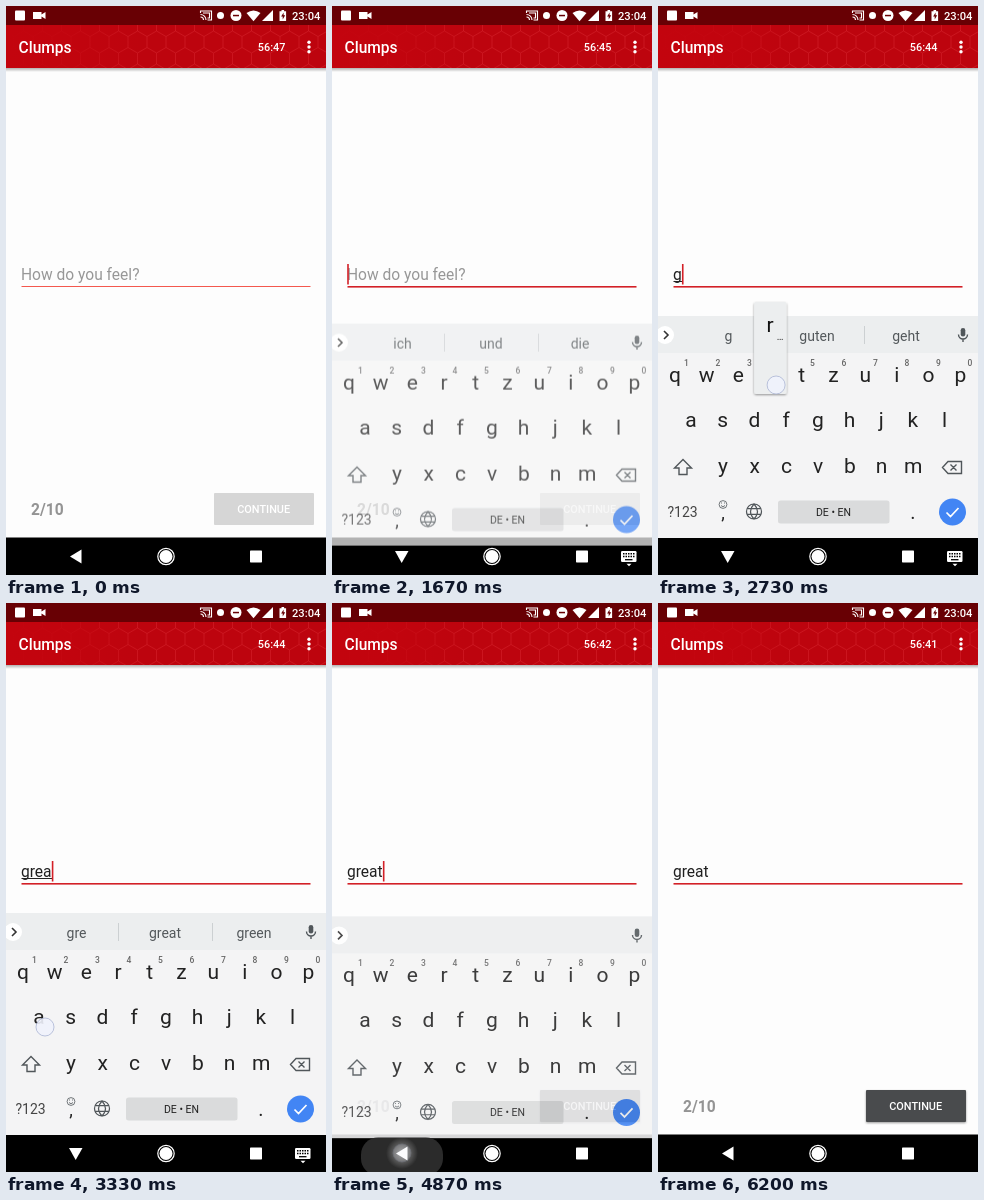
Animation, 320 px wide and 569 px high, one loop 6.27 s. Source, as an HTML page:

```html
<!DOCTYPE html>
<html lang="en">
<head>
<meta charset="utf-8">
<title>Feeling survey</title>
<style>
  html, body { margin: 0; width: 100%; height: 100%; overflow: hidden; background: #fdfdfd; }
  svg { display: block; width: 100vw; height: 100vh; }
  text { font-family: Roboto, Arial, sans-serif; white-space: pre; }
  .mid { text-anchor: middle; }
  .line { fill: none; stroke: #50565a; stroke-width: 1.4; }
</style>
</head>
<body>
<svg viewBox="0 0 320 569" preserveAspectRatio="none">
  <defs>
    <pattern id="hex" width="19" height="33" x="8" y="14" patternUnits="userSpaceOnUse">
      <path d="M9.5 0V11L0 16.5V27.5L9.5 33M9.5 11L19 16.5V27.5L9.5 33" fill="none" stroke="#db2b32" stroke-opacity=".5" stroke-width=".9"/>
    </pattern>
    <linearGradient id="barFade">
      <stop offset="0" stop-color="#c3040e"/>
      <stop offset=".2" stop-color="#c3040e" stop-opacity=".8"/>
      <stop offset=".42" stop-color="#c3040e" stop-opacity="0"/>
    </linearGradient>
    <linearGradient id="barShadow" x2="0" y2="1">
      <stop offset="0" stop-opacity=".3"/><stop offset="1" stop-opacity="0"/>
    </linearGradient>
    <radialGradient id="glow">
      <stop offset="0" stop-color="#fff" stop-opacity=".5"/><stop offset="1" stop-color="#fff" stop-opacity="0"/>
    </radialGradient>
    <filter id="lift" x="-20%" y="-20%" width="140%" height="140%">
      <feDropShadow dx="0" dy="1" stdDeviation="1.3" flood-opacity=".4"/>
    </filter>
  </defs>

  <rect width="320" height="569" fill="#fdfdfd"/>

  <!-- question -->
  <text id="hint" x="15" y="274" font-size="15.57" fill="#979797">How do you feel?</text>
  <text id="answer" x="15" y="274" font-size="15.57" fill="#202020"></text>
  <rect id="composing" x="15.5" y="275" height="1" fill="#222"/>
  <rect id="fieldLine" x="15.5" width="289"/>
  <rect id="cursor" y="258" width="1.6" height="20.5" fill="#d32027"/>
  <text x="25" y="509" font-size="15.57" font-weight="700" fill="#949494">2/10</text>
  <rect id="button" x="208" y="487" width="100" height="32" rx="1"/>
  <text class="mid" x="257.7" y="507" font-size="10.9" font-weight="500" fill="#fff">CONTINUE</text>

  <!-- bars -->
  <rect y="62" width="320" height="4" fill="url(#barShadow)"/>
  <rect y="18" width="320" height="44" fill="#bd040e"/>
  <rect y="19" width="320" height="43" fill="url(#hex)"/>
  <rect y="19" width="320" height="43" fill="url(#barFade)"/>
  <rect width="320" height="19" fill="#680004"/>
  <g fill="#fff">
    <rect x="9" y="4.5" width="10" height="10" rx="1"/>
    <path d="M27 6h8.500v2.600L39.500 6v7L35.500 10.600V13H27z"/>
    <path d="M194.500 7V5h11v9h-4M194.500 8.500a5.500 5.500 0 0 1 5.500 5.500M194.500 11a3 3 0 0 1 3 3M197 7h6.500v5h-2" fill="none" stroke="#fff" stroke-width="1.100"/>
    <circle cx="214.500" cy="9.500" r="3.500"/>
    <circle cx="230" cy="9.500" r="5.500"/>
    <rect x="227" y="8.800" width="6" height="1.500" fill="#680004"/>
    <path d="M240.500 7Q247.500 1.800 254.500 7L247.500 15.200z"/>
    <path d="M256 15L267 4V15z"/>
    <path d="M273.500 5.200h2V4h2.600v1.200h2V15h-6.600z"/>
    <path d="M277.600 6.500l-2.500 4h1.600v3l2.500-4.200h-1.600z" fill="#680004"/>
    <text x="286" y="13.800" font-size="11.200" font-weight="500">23:04</text>
    <text x="12.500" y="46.600" font-size="15.570" font-weight="500">Clumps</text>
    <text id="clock" x="251.800" y="44.800" font-size="10.900" font-weight="500"></text>
    <circle cx="303" cy="36.200" r="1.700"/><circle cx="303" cy="41" r="1.700"/><circle cx="303" cy="45.800" r="1.700"/>
  </g>
  <rect y="531.5" width="320" height="38"/>

  <!-- keyboard -->
  <g id="keyboard">
    <rect y="310" width="320" height="222" fill="#f4f4f5"/>
    <rect y="310" width="320" height="37" fill="#eceeef"/>
    <rect y="532" width="320" height="37"/>
    <circle cx="7" cy="329" r="9" fill="#fff"/>
    <path d="M6 325l4 4-4 4" fill="none" stroke="#333" stroke-width="1.600"/>
    <g id="words" font-size="14" fill="#53585b">
      <path d="M112.500 320v18M206.500 320v18" stroke="#ccd0d2"/>
    </g>
    <rect x="302.700" y="322" width="4.600" height="8.500" rx="2.300" fill="#50565a"/>
    <path class="line" d="M300.500 328.500a4.500 4.500 0 0 0 9 0M305 333v3"/>
    <g id="keys" class="mid" font-size="21" fill="#222"></g>
    <path class="line" d="M25 453.500l8.500 8.500H29v6.500h-8V462h-4.500z"/>
    <path class="line" d="M290 455.500h13.500v12H290l-5.500-6zM292.500 458.500l6 6M298.500 458.500l-6 6"/>
    <text x="9.500" y="510.500" font-size="14" fill="#444">?123</text>
    <circle class="line" cx="65" cy="498.500" r="3.900" style="stroke-width:.8"/>
    <path class="line" d="M63 499.500q2 2.500 4 0M63.500 496.500v1M66.500 496.500v1" style="stroke-width:.8"/>
    <text class="mid" x="65" y="513" font-size="18" fill="#222">,</text>
    <path class="line" d="M88.500 505.500a7.500 7.500 0 1 0 15 0a7.500 7.500 0 1 0-15 0M96 498q-7 7.500 0 15q7-7.500 0-15M89.500 502.700h13M89.500 508.300h13" style="stroke-width:1.200"/>
    <rect x="120" y="494.500" width="111.500" height="23" rx="2.500" fill="#dadbdc"/>
    <text class="mid" x="175.500" y="509.500" font-size="10.500" fill="#222">DE • EN</text>
    <text class="mid" x="255" y="513" font-size="20" fill="#222">.</text>
    <circle cx="294.500" cy="506" r="13.500" fill="#4285f4"/>
    <path d="M288.500 506.500l4 4 8-8.500" fill="none" stroke="#fff" stroke-width="1.700"/>
    <g id="popup">
      <rect x="-16" y="-80" width="32.500" height="92" rx="2" fill="#eceeef" filter="url(#lift)"/>
      <text class="mid" y="-50" font-size="21" fill="#111"></text>
      <text class="mid" x="10" y="-42" font-size="10" fill="#222">…</text>
    </g>
  </g>

  <!-- navigation -->
  <g id="ripple">
    <rect x="29" y="534.5" width="82" height="38" rx="17" fill="#2b2b2b"/>
    <circle cx="70" cy="550" r="16" fill="url(#glow)"/>
  </g>
  <g fill="#fff">
    <path id="back" d="M64 550.500L75.500 543.500V557.500z"/>
    <path id="down" d="M63 545H76.500L69.700 557z"/>
    <circle cx="160" cy="550.500" r="8.200" fill="none" stroke="#fff" stroke-width="1.200"/>
    <circle cx="160" cy="550.500" r="6.500"/>
    <rect x="244" y="544.500" width="12" height="12" rx=".7"/>
    <g id="imeIcon">
      <rect x="289" y="545" width="15.500" height="11" rx="1.200"/>
      <path d="M291 547.800h12M291 550.500h12" stroke="#000" stroke-width="1.500" stroke-dasharray="1.500 1"/>
      <path d="M293 553.700h7.500" stroke="#000" stroke-width="1.300"/>
      <path d="M294.500 557.800h5l-2.500 2.500z"/>
    </g>
  </g>
  <circle id="touch" r="9" fill="#f0f2fc" fill-opacity=".9" stroke="#aab4d4" stroke-width=".8"/>
</svg>

<script>
const LOOP = 6270, FRAME = 200 / 3;
const $ = id => document.getElementById(id);
const set = (el, attrs) => { for (const k in attrs) el.setAttribute(k, attrs[k]); };
const show = (el, on) => el.setAttribute('visibility', on ? 'visible' : 'hidden');
const clamp = v => Math.max(0, Math.min(1, v));
const at = (steps, t) => steps.filter(s => s[0] <= t).pop()[1];

function addText(parent, text, attrs) {
  const el = document.createElementNS('http://www.w3.org/2000/svg', 'text');
  el.textContent = text;
  set(el, attrs);
  return parent.appendChild(el);
}

const STEP = 31.7;
const keyAt = {};
[['qwertzuiop', 17, 376], ['asdfghjkl', 33, 421], ['yxcvbnm', 65, 467]].forEach(([row, left, y]) =>
  [...row].forEach((key, i) => {
    keyAt[key] = { x: left + i * STEP, y };
    addText($('keys'), key, { class: 'mid', x: left + i * STEP, y });
  }));
[...'1234567890'].forEach((digit, i) =>
  addText($('keys'), digit, { class: 'mid', x: 28.5 + i * 31.5, y: 360, 'font-size': 8.5, 'font-weight': 500, fill: '#666' }));
const words = [70.5, 159, 248].map(x => addText($('words'), '', { class: 'mid', x, y: 335 }));
const letter = $('popup').querySelector('text');

// key, down, up
const presses = [['g', 2470, 2600], ['r', 2670, 2800], ['e', 2930, 3070], ['a', 3200, 3330], ['t', 3530, 3730]];
const answers = [[0, ''], ...presses.map(([, , up], i) => [up, 'great'.slice(0, i + 1)])];
const suggestions = [
  [0, 'ich und die'], [2670, 'g guten geht'], [2870, 'gr great große'], [3130, 'gre great green'],
  [3400, 'grea great greatly'], [3800, 'great greatly greatest'], [4800, '']
];
const clocks = [[0, 47], [670, 46], [1670, 45], [2670, 44], [3600, 43], [4600, 42], [5600, 41]];
const blinks = [[0, 0], [1400, 1], [1930, 0], [2400, 1], [4270, 0], [4730, 1], [5200, 0], [5730, 1], [6200, 0]];

// x, y, down, up
const touches = [
  [148, 268, 1270, 1400],
  ...presses.map(([key, down, up]) => [keyAt[key].x + 6, keyAt[key].y + 3, down, up]),
  [70, 550, 4600, 4730]
];

function drawField(t) {
  const text = at(answers, t), focused = t >= 1400;
  $('answer').textContent = text;
  const width = text ? $('answer').getComputedTextLength() : 0;
  show($('hint'), !text);
  show($('composing'), text && t < 4800);
  set($('composing'), { width });
  set($('cursor'), { x: 15.2 + width });
  show($('cursor'), at(blinks, t));
  set($('fieldLine'), focused
    ? { y: 280, height: 1.6, fill: '#d32027' }
    : { y: 280, height: 1, fill: '#f4584e' });
  set($('button'), { fill: text ? '#4a4c4d' : '#d6d6d6', filter: text ? 'url(#lift)' : 'none' });
}

function drawKeyboard(t) {
  const entering = 1 - (1 - clamp((t - 1550) / 250)) ** 2;
  const leaving = clamp((t - 4800) / 200) ** 2;
  const shown = entering - leaving;
  set($('keyboard'), { opacity: shown, transform: `translate(0 ${28 * (1 - shown)})` });
  show($('keyboard'), shown > 0);

  const list = at(suggestions, t);
  words.forEach((el, i) => el.textContent = list.split(' ')[i] || '');
  set($('words'), { opacity: list ? 1 : 0 });

  const press = presses.find(([, down, up]) => t >= down && t < up);
  set($('popup'), { opacity: press ? 1 : 0 });
  if (press) {
    const { x, y } = keyAt[press[0]];
    set($('popup'), { transform: `translate(${x} ${y})` });
    letter.textContent = press[0];
  }
}

function drawNavigation(t) {
  const open = t >= 1470 && t < 4800;
  show($('back'), !open);
  show($('down'), open);
  show($('imeIcon'), open);
  set($('ripple'), { opacity: clamp((t - 4570) / 130) * clamp((5200 - t) / 330) });
}

function drawTouch(t) {
  const touch = touches.filter(p => p[2] <= t).pop();
  if (touch) set($('touch'), { cx: touch[0], cy: touch[1] });
  set($('touch'), { opacity: touch ? clamp(1 - (t - touch[3]) / 180) : 0 });
}

function draw(t) {
  $('clock').textContent = '56:' + at(clocks, t);
  drawField(t);
  drawKeyboard(t);
  drawNavigation(t);
  drawTouch(t);
}

const start = performance.now();
function tick() {
  const elapsed = (performance.now() - start) % LOOP;
  draw(Math.round(Math.floor((elapsed + 4) / FRAME) * FRAME / 10) * 10 % LOOP);
  requestAnimationFrame(tick);
}
tick();
</script>
</body>
</html>
```
